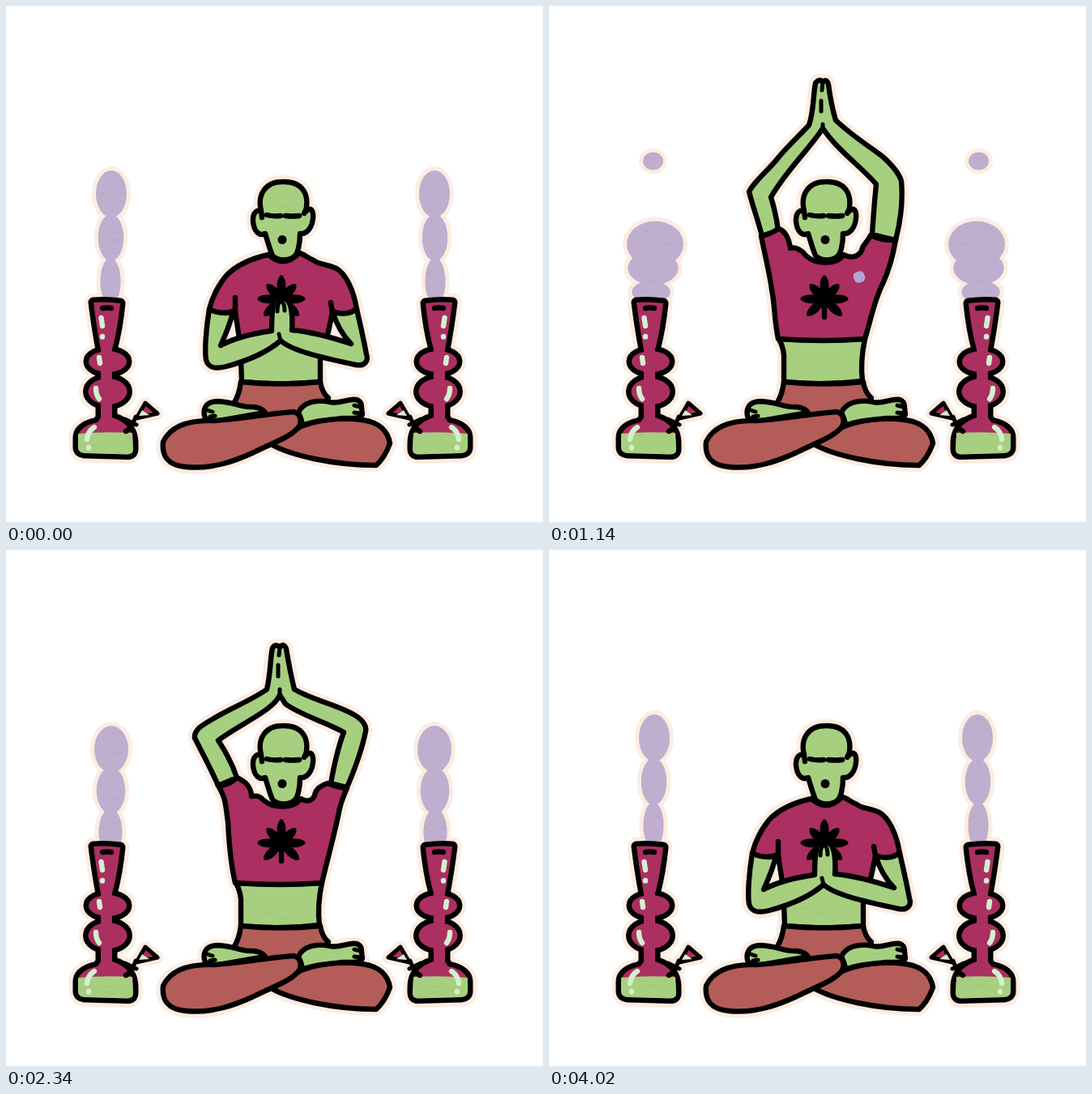
Write an HTML page that moves like this. It is 663x637 px and loops after 4.08 s.

```html
<!DOCTYPE html>
<html lang="en">
<head>
<meta charset="utf-8">
<title>Meditation</title>
<style>
  html, body { margin: 0; width: 100%; height: 100%; overflow: hidden; background: #fff; }
  svg { display: block; width: 663px; height: 637px; }
  path, .glass {
    stroke: var(--ink, #000);
    stroke-width: calc(var(--w, 6.4px) + var(--spread, 0px));
    stroke-linecap: round; stroke-linejoin: round;
  }
  .halo { --ink: #fcede2; --spread: 10px; --mist: #fcede2; }
  .rim { --w: 13px; }
  .fill { --ink: none; }
  .thin { --w: 5px; }
  .smoke { fill: url(#fog); stroke: var(--mist, none); stroke-width: 10px; }
  .skin { fill: url(#green); }
  .shirt { fill: #ab2f60; }
  .pants { fill: #b35c58; }
  .line { fill: none; }
  .flat { stroke: none; }
  .shine { fill: none; stroke: #d3efd0; }
</style>
</head>
<body>
<svg viewBox="0 0 663 637">
  <defs>
    <pattern id="green" width="96" height="96" patternUnits="userSpaceOnUse"><rect width="96" height="96" fill="#a7cf80"/></pattern>
    <pattern id="fog" width="96" height="96" patternUnits="userSpaceOnUse"><rect width="96" height="96" fill="#c0aecf"/></pattern>

    <g id="leaf"><path d="M340 362V384"/></g>
    <g id="smoke" class="smoke"></g>

    <g id="head">
      <path class="skin" d="M315 253C310 233 320 217 341 217C366 216 375 232 370 254C376 247 380 252 379 262C378 274 371 282 363 281C363 295 360 306 356 309C350 315 335 315 329 308C325 299 323 290 320 281C311 285 306 276 305 266C304 255 310 251 315 253Z"/>
      <path class="line" d="M315 253L316 261M370 252L368 256M322 258Q330 260 339 259M345 259Q354 260 362 259"/>
      <circle cx="341" cy="288.500" r="5.500"/>
    </g>

    <g id="legs">
      <path class="pants" d="M290 464Q340 469 388 464Q390 477 398 484L375 525L300 520L281 491Q288 480 290 464Z"/>
      <path class="pants" d="M327 541C352 555 405 567 457 567C464 561 470 551 474 540C472 526 462 514 440 511C415 508 388 510 364 519Z"/>
      <path class="skin" d="M246 509C242 498 246 488 262 488C282 489 290 496 306 495Q316 496 320 502Q285 508 258 513Z"/>
      <path class="pants" d="M355 501C325 503 292 510 256 512C224 511 203 519 194 538C192 556 200 567 222 569C255 572 282 562 306 551C332 538 352 532 362 519C366 510 362 502 355 501Z"/>
      <path class="skin" d="M361 502C366 490 382 485 400 489C412 492 422 484 433 486C441 489 438 495 440 503C440 510 428 509 416 509C396 511 380 512 366 518Q365 509 361 502Z"/>
      <path class="line thin" d="M246 498L255 501M252 507L258 506M438 495L430 493M439 503L430 502"/>
    </g>

    <g id="rest">
      <path class="skin" d="M289 407L291 464Q340 469 388 464L388 407Z"/>
      <path class="shirt" d="M324 307C305 311 283 320 271 334C260 348 254 362 251 374C260 380 272 380 283 376C284 386 286 396 288 410L396 410C399 398 401 388 403 378C413 382 424 380 433 374C429 350 419 330 408 324C395 318 385 319 380 314C372 311 368 306 362 305Q343 324 324 307Z"/>
      <path class="line" d="M283 360V376M401 366L403 378"/>
      <use href="#leaf"/>
      <path class="skin" d="M251 374C247 398 245 425 247 437C250 448 260 448 272 445C298 438 322 428 339 413C352 425 385 433 432 443C443 445 448 438 445 430C441 408 437 392 433 374C424 381 412 381 403 377Q411 402 426 417C405 410 375 402 353 400C354 385 353 368 347 363C342 358 334 360 331 365C328 375 328 390 328 401C300 405 280 411 265 419C271 406 277 392 280 378C272 380 258 379 251 374Z"/>
      <path class="line thin" d="M335 377Q335 368 338 365M344 376Q344 368 341 365M339 413L337 405"/>
    </g>

    <g id="waist">
      <path class="skin" d="M284 411Q291 425 290 437L290 464Q340 469 387 463Q384 440 390 411Z"/>
    </g>

    <g id="mid">
      <use href="#waist"/>
      <path class="skin" d="M262 291C252 268 242 250 233 232Q232 226 239 219C266 199 300 188 322 172C327 152 326 134 329 121Q333 115 338 120Q343 114 346 122C349 140 352 156 356 172C382 187 414 192 434 206Q446 215 444 224C440 244 430 272 421 293L401 288C405 266 409 246 417 225C394 212 364 204 345 190L338 179C330 198 290 214 262 235C272 250 280 266 285 281Z"/>
      <path class="line thin" d="M338 120L337 130M336 142V156M338 180V172"/>
      <path class="shirt" d="M262 291C270 291 279 287 285 281C295 285 303 293 303 304C309 303 314 304 317 308C330 320 355 320 364 307C372 312 379 309 381 303C382 295 390 290 397 288Q409 293 421 294C414 310 413 315 412 319C406 350 396 385 390 411Q340 415 283 411C276 382 275 352 274 336C271 315 272 308 262 291Z"/>
      <use href="#leaf"/>
    </g>

    <g id="high">
      <use href="#waist"/>
      <path class="skin" d="M263 284C258 264 251 246 247 229C256 213 273 201 284 186C297 171 309 160 321 147C327 130 326 110 329 95Q334 89 338 94Q343 89 345 97C347 112 350 128 354 141C375 161 398 175 412 186Q431 203 435 216C437 238 434 266 428 289L399 282Q401 250 404 220C385 198 356 178 338 151C322 176 292 204 274 236Q280 255 283 277Z"/>
      <path class="line thin" d="M338 94L337 104M336 117V130M338 152V146"/>
      <path class="shirt" d="M262 284Q273 282 283 275C290 276 296 285 298 299C304 297 312 301 317 308C330 320 355 320 364 307C374 313 383 308 386 302C387 294 392 294 397 283Q412 290 428 289C424 312 419 328 412 343C402 362 398 385 390 411Q340 415 283 411C278 388 279 370 275 350C272 328 266 305 262 284Z"/>
      <use href="#leaf"/>
    </g>

    <g id="glass">
      <path d="M108 366Q124 364.500 141 367Q138 398 131 424V508Q157 516 157 540V547Q157 553.500 150 553.500L97 552Q89 551 89 545V535Q88 519 113 514L117 508V424Q112 398 108 366Z"/>
      <ellipse class="glass" cx="125.500" cy="439" rx="23.500" ry="13"/>
      <ellipse class="glass" cx="125.500" cy="476" rx="24" ry="16"/>
    </g>
    <g id="bong">
      <path class="line thin" d="M147 510L161 517M160 507L153 526M147 527H157"/>
      <path class="shirt thin" d="M172 490L187 503L161 509Z"/>
      <path class="flat" fill="#d3efd0" d="M168 499L177 505L164 506Z"/>
      <use class="rim" href="#glass"/>
      <use class="fill" href="#glass" fill="#ab2f60"/>
      <path class="skin flat" d="M89 528Q120 525 156 527L157 547Q157 553.500 150 553.500L97 552Q89 551 89 545Z"/>
      <path class="line" d="M119 373Q125 372 130 373M148 525L154 521"/>
      <path class="shine" d="M117.500 385L119 395M119 408V408.500M115 434L116 441M111 472Q111 480 115 485M109 520Q101 525 100 535M102 545V545.500"/>
    </g>
  </defs>

  <g id="halos" class="halo"></g>
  <g id="inks"></g>
  <g id="breath" fill="#b1a6d0"></g>
</svg>

<script>
const LOOP = 4080, TICK = 60, SWING = LOOP / 2, STEP = 240;
const $ = id => document.getElementById(id);
const svg = (tag, attrs, parent) => {
  const node = document.createElementNS('http://www.w3.org/2000/svg', tag);
  for (const k in attrs) node.setAttribute(k, attrs[k]);
  return parent.appendChild(node);
};
const random = seed => () => {
  seed = (seed * 1664525 + 1013904223) >>> 0;
  return seed / 4294967296;
};
const oval = (cx, cy, rx, ry = rx) => `<ellipse cx="${cx}" cy="${cy}" rx="${rx}" ry="${ry}"/>`;

// Seven blades in a fan
for (let i = -3; i <= 3; i++) {
  const len = Math.abs(i) === 1 ? 23 : 27;
  svg('path', {
    d: `M0 0Q-6 ${-len * 0.7} 0 ${-len}Q6 ${-len * 0.7} 0 0Z`,
    transform: `translate(340 362) rotate(${i * 44.5})`, class: 'thin'
  }, $('leaf'));
}

// Soft grain
function addGrain(id, color) {
  const r = random(id.length);
  for (let i = 0; i < 34; i++) {
    svg('path', {
      d: `M${8 + r() * 74} ${4 + r() * 88}l${2 + r() * 7} ${r() * 4 - 2}`,
      style: `stroke:${color};stroke-width:${1 + r() * 2}px;opacity:.35`
    }, $(id));
  }
}
addGrain('green', '#9bc273');
addGrain('fog', '#b3a0c4');

// All halos lie below all inked shapes
const poseUses = [];
for (const layer of [$('halos'), $('inks')]) {
  for (const transform of ['', 'translate(659 0) scale(-1 1)']) {
    const side = svg('g', { transform }, layer);
    for (const id of ['smoke', 'bong']) svg('use', { href: '#' + id }, side);
  }
  poseUses.push(svg('use', { href: '#rest' }, layer));
  for (const id of ['legs', 'head']) svg('use', { href: '#' + id }, layer);
}

// Levels 0-1: thin column; 2-4: sinking cloud with a rising, shrinking puff
function smoke(level) {
  const m = level - 2, lobes = [0, 1, 2];
  if (m < 0) return lobes.map(i =>
    oval(130 - i / 2, 232 + 14 * level + i * (54 - 3 * level), 19 + 2 * level - 3.2 * i, 29)).join('');
  return oval(129 - m / 2, 206 - 14.5 * m, 20 - 7.5 * m, 16 - 5 * m) + lobes.map(i =>
    oval(131 - 2.5 * i, 269 + 25 * m + i * (39 - 9.5 * m),
      31 + 4 * m - 2 * i - 1.8 * i * i, 31 - 2.5 * m - i * (5.5 + 2 * m))).join('');
}

// Exhaled puff drifts down to the right and shrinks
function breath(p) {
  if (p < 0 || p >= 1) return '';
  const x = 368 + 30 * p, y = 309 + 51 * p, r = 11 - 7.7 * p;
  let out = p < 0.2 ? `<path class="flat" d="M345 278L${x} ${y - 8}L${x - 13} ${y + 6}Z"/>` : '';
  for (let i = 0; i < 4; i++) {
    const a = i * Math.PI / 2 + 0.4, gap = r * 0.55 * (1 - p);
    out += oval(x + gap * Math.cos(a), y + gap * Math.sin(a), r * (0.55 + 0.45 * p));
  }
  return out;
}

function pose(t) {
  const lift = Math.min(t - 660, 2340 - t);
  return lift < 0 ? 'rest' : lift < 360 ? 'mid' : 'high';
}

let last = -1;
function draw() {
  const tick = Math.floor((performance.now() % LOOP) / TICK);
  if (tick !== last) {
    last = tick;
    const t = tick * TICK, phase = t % SWING;
    const rise = Math.min(phase + TICK, SWING - phase);
    $('smoke').innerHTML = smoke(Math.min(4, Math.floor(rise / STEP)));
    $('breath').innerHTML = breath((t - 660) / 960);
    poseUses.forEach(u => u.setAttribute('href', '#' + pose(t)));
    const r = random(tick * 7919);
    for (const id of ['green', 'fog'])
      $(id).setAttribute('patternTransform', `translate(${r() * 96} ${r() * 96})`);
  }
  requestAnimationFrame(draw);
}
draw();
</script>
</body>
</html>
```
